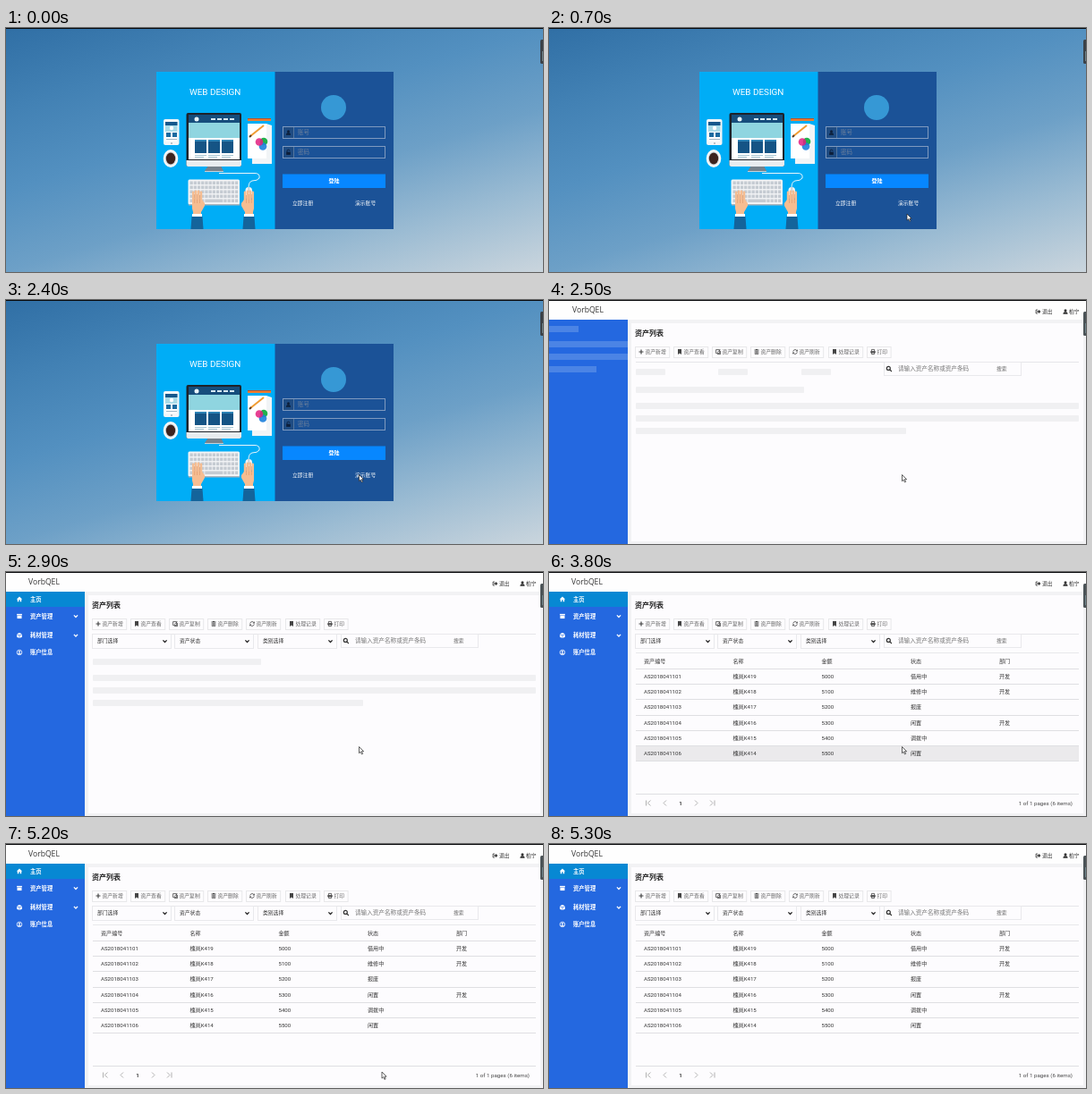
Recreate the animation shown at these times as an HTML page with a canvas. Size 600 by 273 pixels, loop 6.2 s.

```html
<!DOCTYPE html>
<html lang="zh-CN">
<head>
<meta charset="utf-8">
<title>资产列表</title>
<style>
html, body { margin: 0; width: 100%; height: 100%; overflow: hidden; background: #fff; }
canvas { display: block; width: 600px; height: 273px; }
</style>
</head>
<body>
<canvas id="stage" width="600" height="273"></canvas>
<script>
const ctx = document.getElementById('stage').getContext('2d');
const LOOP = 6200;
const FONT = 'Roboto, "Noto Sans CJK SC", "Noto Sans CJK", sans-serif';
const TITLE_FONT = '"Open Sans", sans-serif';
const APP = 'VorbQEL';
const USER = '柏宁';

function rect(x, y, w, h, color) {
  ctx.fillStyle = color;
  ctx.fillRect(x, y, w, h);
}

function box(x, y, w, h, color) {
  ctx.strokeStyle = color;
  ctx.lineWidth = 1;
  ctx.strokeRect(x + .5, y + .5, w - 1, h - 1);
}

function round(x, y, w, h, r, color) {
  ctx.fillStyle = color;
  ctx.beginPath();
  ctx.roundRect(x, y, w, h, r);
  ctx.fill();
}

function oval(x, y, rx, ry, color) {
  ctx.fillStyle = color;
  ctx.beginPath();
  ctx.ellipse(x, y, rx, ry, 0, 0, Math.PI * 2);
  ctx.fill();
}

function disc(x, y, r, color) {
  oval(x, y, r, r, color);
}

function shape(d, color) {
  ctx.fillStyle = color;
  ctx.fill(new Path2D(d));
}

function line(d, color, width = 1) {
  ctx.strokeStyle = color;
  ctx.lineWidth = width;
  ctx.stroke(new Path2D(d));
}

// y is the vertical middle of the glyphs
function text(str, x, y, size, color, { weight = 400, align = 'left', font = FONT } = {}) {
  ctx.font = `${weight} ${size}px ${font}`;
  ctx.textAlign = align;
  ctx.fillStyle = color;
  ctx.fillText(str, x, y + size * .37);
}

function at(x, y, draw) {
  ctx.save();
  ctx.translate(x, y);
  draw();
  ctx.restore();
}

// Icons are centred on their position
const icons = {
  plus: c => line('M-2.5 0H2.5M0 -2.5V2.5', c, 1.2),
  mark: c => shape('M-2 -3H2V3L0 1.4L-2 3Z', c),
  copy: c => { line('M-2.4 -2.4H1.6V1.6H-2.4ZM-1 2.6H2.6V-1', c, .8); line('M-1 .6L2.4 -2.4', c, .8); },
  trash: c => { shape('M-2.5 -2.4H2.5V-1.6H-2.5ZM-1 -3H1V-2.4H-1Z', c); line('M-1.8 -1V2.6H1.8V-1M-.6 -1V2M.6 -1V2', c, .7); },
  refresh: c => { line('M-2.3 -.5A2.4 2.4 0 0 1 1.8 -1.6M2.3 .5A2.4 2.4 0 0 1 -1.8 1.6', c, .9); shape('M2.8 -2.8V-.6H.6ZM-2.8 2.8V.6H-.6Z', c); },
  print: c => { line('M-1.6 -.6V-2.6H1.6V-.6M-1.6 1V2.5H1.6V1', c, .8); rect(-2.7, -.8, 5.4, 2, c); },
  exit: c => { line('M-.4 -2H-2.4V2H-.4', c, .8); shape('M-1.2 -.7H.6V-2.2L2.9 0L.6 2.2V.7H-1.2Z', c); },
  user: c => { disc(0, -1.3, 1.5, c); shape('M-2.6 2.8C-2.6 .4 -1.4 .2 0 .2S2.6 .4 2.6 2.8Z', c); },
  lock: c => { rect(-2.3, -.3, 4.6, 3.2, c); line('M-1.4 0V-1.4A1.4 1.4 0 0 1 1.4 -1.4', c, .9); },
  home: c => shape('M0 -3L3.2 0H2.2V2.7H.7V.8H-.7V2.7H-2.2V0H-3.2Z', c),
  archive: c => { rect(-2.9, -2.6, 5.8, 1.5, c); rect(-2.5, -.7, 5, 3.3, c); },
  cube: c => shape('M0 -3.1L2.9 -1.8L0 -.5L-2.9 -1.8ZM-2.9 -1.1L-.3 .1V3L-2.9 1.8ZM2.9 -1.1L.3 .1V3L2.9 1.8Z', c),
  account: c => { line('M2.8 0A2.8 2.8 0 1 1 -2.8 0A2.8 2.8 0 1 1 2.8 0', c, .8); disc(0, -.7, 1.1, c); shape('M-1.9 1.9C-1.5 .2 1.5 .2 1.9 1.9Z', c); },
  search: c => line('M1.3 -.6A2 2 0 1 1 -2.7 -.6A2 2 0 1 1 1.3 -.6M.8 .9L2.9 3', c, 1.2),
  down: c => line('M-2.1 -1.1L0 1L2.1 -1.1', c, 1.3)
};

function icon(name, x, y, color) {
  at(x, y, () => icons[name](color));
}

function edgeTab(color) {
  rect(0, 0, 600, 1, '#08090b');
  round(597, 13, 6, 27, 1.5, color);
  rect(599, 26, 1, 11, '#6d8288');
}

function sky() {
  const g = ctx.createLinearGradient(0, 0, 126, 416);
  const stops = ['#306fa5', '#4281b4', '#5390c0', '#6da0c7', '#9cbcd3', '#cad5dd'];
  stops.forEach((c, i) => g.addColorStop(i / 5, c));
  rect(0, 0, 600, 273, g);
}

function tablet() {
  round(176, 102, 17.5, 29, 2, '#f4f6f8');
  rect(178, 105, 13.5, 22, '#a9dbe8');
  rect(178, 105, 13.5, 4, '#16588c');
  disc(185, 112, 2.2, '#fff');
  rect(178, 116, 13.5, 11, '#fff');
  for (const x of [179, 186]) rect(x, 117, 5, 5, '#1b6ba0');
  rect(179, 124, 12, 1, '#9db5c4');
  disc(185, 129, 1, '#a8b0b8');
}

function monitor() {
  shape('M226 154H240L243 160V161H222V160Z', '#76828c');
  rect(222, 160, 21, 1, '#c9d0d6');
  round(201.5, 95, 61.5, 60, 2, '#1d2129');
  shape('M201.5 148H263V153Q263 155 261 155H203.5Q201.5 155 201.5 153Z', '#e8ecef');
  rect(204, 97, 57, 50, '#fff');
  rect(204, 97, 57, 9, '#164d7c');
  disc(213, 102, 2.5, '#e8f4fa');
  for (let i = 0; i < 4; i++) rect(229 + i * 7, 101, 5, 2, '#d6eaf4');
  rect(204, 106, 57, 17, '#8fd5e0');
  for (let i = 0; i < 3; i++) {
    const x = 211 + i * 15;
    rect(x, 125, 13, 15, '#155485');
    rect(x, 125, 13, 2, '#2d82b5');
    for (let k = 0; k < 2; k++) rect(x, 142 + k * 2, 13 - k * 3, 1, '#a6c4d1');
  }
}

function papers() {
  rect(270, 107, 21, 39, '#fff');
  shape('M291 107L297 109V152H275V146H291Z', '#f1f4f6');
  line('M270 102.5H296', '#ed7d31', 3);
  line('M270 101.5H296', '#b9542c', 1);
  line('M273 121L288 109', '#f09c32', 2);
  line('M272 122L274 120', '#5b3b25', 2);
  disc(288, 127, 4.3, '#20b24b');
  disc(287, 132.5, 4.3, 'rgba(28,128,220,.9)');
  disc(283, 127.5, 4.3, 'rgba(226,30,128,.85)');
}

function keyboard() {
  round(203.5, 169.5, 57.5, 28, 1.5, '#f3f4f6');
  rect(204, 197, 57, 1.5, '#aab4bd');
  for (let row = 0; row < 5; row++) {
    const y = 171.5 + row * 5;
    for (let col = 0; col < 13; col++) {
      if (row === 4 && col > 3 && col < 9) continue;
      rect(205.5 + col * 4.2, y, 3.3, 3.6, '#c5cbd2');
    }
  }
  rect(222.3, 191.5, 20.1, 3.6, '#c5cbd2');
}

function hand(x, flip) {
  at(x, 0, () => {
    if (flip) ctx.scale(-1, 1);
    const skin = '#f6bd91';
    for (let i = 0; i < 4; i++) round(-6 + i * 2.9, 181 + Math.abs(i - 1.5), 2.5, 17, 1.2, skin);
    shape('M-6 192H5L8 196V199L4 206V211H-5V206L-6 202Z', skin);
    line('M-3.3 186V196M-.4 186V196M2.5 187V196', '#dc966b', .6);
    rect(-6, 208, 11, 3, '#fff');
    shape('M-6.5 211H5.5L6.5 225H-7.5Z', '#14649b');
  });
}

function illustration() {
  rect(168, 49, 133, 176, '#00adf6');
  text('WEB DESIGN', 205, 71, 9.9, '#fff');
  tablet();
  oval(184, 146, 8.3, 10, '#f7f7f7');
  oval(184, 146, 6.2, 7.6, '#d3d7da');
  oval(184, 146, 5.2, 6.5, '#3d2420');
  papers();
  line('M238 162.5H278Q284 162.5 283 168Q281 171 275 171Q271 172 271 179', '#e8f5fb', 1);
  monitor();
  keyboard();
  round(267.5, 178, 7.5, 14, 3.5, '#f0f2f4');
  line('M271.2 178V184', '#a4adb4', .8);
  hand(214, false);
  hand(271, true);
}

function field(y, name, hint) {
  box(309, y, 115, 14, '#7f9abf');
  rect(310, y + 1, 11, 12, '#1f4c83');
  rect(321, y + 1, 1, 12, '#53759f');
  icon(name, 315.5, y + 7, '#0d1f3a');
  text(hint, 326, y + 7, 6.5, '#6f819b');
}

function loginPage() {
  sky();
  illustration();
  rect(300.5, 49, 132.5, 176, '#1b5297');
  disc(366, 89, 14, '#3698d5');
  field(110, 'user', '账号');
  field(132, 'lock', '密码');
  rect(309, 163.5, 115, 15.5, '#0787ff');
  text('登陆', 366.5, 171, 6, '#fff', { weight: 700, align: 'center' });
  text('立即注册', 320, 196, 5.8, '#fff', { weight: 500 });
  text('演示账号', 390, 196, 5.8, '#fff', { weight: 500 });
  edgeTab('#3b4147');
}

const toolbar = [
  [96, 'plus', '资产新增'], [139, 'mark', '资产查看'], [182, 'copy', '资产复制'],
  [225, 'trash', '资产删除'], [268, 'refresh', '资产刷新'], [312, 'mark', '处理记录'],
  [355, 'print', '打印']
];
const combos = [[97, '部门选择'], [189, '资产状态'], [282, '类别选择']];
const menu = [
  [30.5, 'home', '主页'], [49.5, 'archive', '资产管理', true],
  [71, 'cube', '耗材管理', true], [90, 'account', '账户信息']
];

function sidebar(ready) {
  rect(0, 22, 88, 251, '#2468e0');
  if (!ready) {
    for (const [y, w] of [[29, 33], [46, 88], [60, 88], [74, 53]]) rect(0, y, w, 7, '#4b84e5');
    return;
  }
  rect(0, 22, 88, 17, '#0788d3');
  for (const [y, name, label, opens] of menu) {
    icon(name, 15, y, '#fff');
    text(label, 27, y, 6.3, '#fff', { weight: 700 });
    if (opens) icon('down', 78, y, '#fff');
  }
}

function filters(ready) {
  rect(97, 69, 495, 1, '#e6e6e9');
  for (const [x, label] of combos) {
    if (!ready) {
      round(x, 77, 33, 7, 1, '#f0f0f2');
      continue;
    }
    box(x - 1, 69, 89, 17, '#e9e9ec');
    text(label, x + 5, 77, 5.8, '#333');
    icon('down', x + 80.5, 77.5, '#222');
  }
  box(374, 69, 154, 16, '#e9e9ec');
  icon('search', 380, 77, '#333');
  text('请输入资产名称或资产条码', 390, 77, 6.6, '#777');
  text('搜索', 500, 77, 5.8, '#666');
}

function skeleton() {
  for (const [y, w] of [[97, 188], [115, 495], [129, 495], [143, 302]]) round(97, y, w, 7, 1, '#f0f0f2');
}

const columns = [106, 205.5, 304.5, 404, 503];
const states = ['借用中', '维修中', '报废', '闲置', '调拨中', '闲置'];

function tableRow(cells, y) {
  cells.forEach((cell, i) => text(cell, columns[i], y, 6.1, '#333'));
}

function table(hover) {
  rect(97, 90, 495, 1, '#e8e8eb');
  tableRow(['资产编号', '名称', '金额', '状态', '部门'], 99.5);
  if (hover) rect(97, 195, 495, 17, '#ebeaec');
  states.forEach((state, i) => {
    rect(97, Math.round(108 + i * 17.2), 495, 1, '#dfdfe2');
    const dept = [0, 1, 3].includes(i) ? '开发' : '';
    tableRow([`AS201804110${i + 1}`, `槐岚K${419 - i}`, `${5000 + i * 100}`, state, dept], 117 + i * 17.1);
  });
  rect(97, 211, 495, 1, '#dfdfe2');
  rect(97, 248, 495, 1, '#dfdfe2');
  line('M108.5 255.5V261.5M113.5 255.5L110.5 258.5L113.5 261.5M131 255.5L128 258.5L131 261.5', '#aaa', .9);
  line('M163 255.5L166 258.5L163 261.5M180 255.5L183 258.5L180 261.5M185 255.5V261.5', '#aaa', .9);
  text('1', 147, 258.5, 6.2, '#333', { weight: 700, align: 'center' });
  text('1 of 1 pages (6 items)', 585, 258.5, 6.2, '#444', { align: 'right' });
}

function assetPage(t) {
  const ready = t >= 2800;
  rect(0, 0, 600, 273, '#f2f2f4');
  rect(0, 0, 600, 22, '#fefefe');
  text(APP, ready ? 25 : 26, 11, 8.6, '#333', { font: TITLE_FONT });
  icon('exit', 546.5, 13, '#333');
  text('退出', 551, 13, 5.8, '#333');
  icon('user', 577, 13, '#333');
  text(USER, 581, 13, 5.8, '#333');
  sidebar(ready);
  rect(92, 26, 505, 244, '#fdfcfe');
  text('资产列表', 96, 37, 8, '#222', { weight: 700 });
  for (const [x, name, label] of toolbar) {
    box(x, 52, label.length * 5.8 + 16, 13, '#e8e8ea');
    icon(name, x + 7, 58, '#444');
    text(label, x + 11.5, 58.2, 5.8, '#666');
  }
  filters(ready);
  if (t < 3800) skeleton();
  else table(t < 5200);
  edgeTab('#4b5357');
}

// Pointer stops: [time, x, y]
const path = [
  [0, 446, 280], [700, 400, 208], [800, 400, 208], [1100, 398, 203],
  [1300, 398, 203], [2000, 394.5, 195.5], [5100, 394.5, 195.5], [5200, 420, 255], [5300, 430, 285]
];

function pointer(t) {
  const i = path.findIndex(p => p[0] > t);
  if (i < 1) return;
  const [t0, x0, y0] = path[i - 1];
  const [t1, x1, y1] = path[i];
  const k = (t - t0) / (t1 - t0);
  const ease = 1 - (1 - k) ** 2;
  at(x0 + (x1 - x0) * ease, y0 + (y1 - y0) * ease, () => {
    const arrow = 'M0 0V7.2L1.7 5.7L2.9 8.4L4.1 7.9L2.9 5.2H5.1Z';
    shape(arrow, '#fff');
    line(arrow, '#222', .7);
  });
}

function frame(now) {
  // The picture advances in tenths of a second
  const t = Math.floor(now % LOOP / 100) * 100;
  if (t < 2500) loginPage();
  else assetPage(t);
  pointer(t);
  requestAnimationFrame(frame);
}

frame(0);
</script>
</body>
</html>
```
